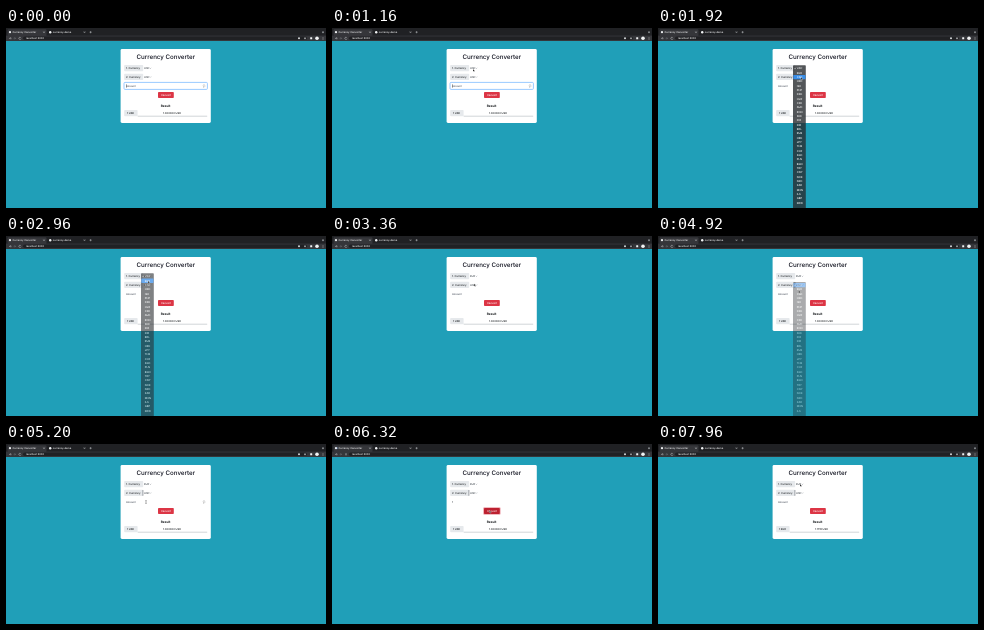
Recreate the animation shown at these times as an HTML page. Size 320x180 px, loop 8000 ms.

```html
<!DOCTYPE html>
<html lang="en">
<head>
<meta charset="utf-8">
<title>Currency Converter</title>
<style>
html, body { margin: 0; width: 100%; height: 100%; overflow: hidden; background: #209fb8; }
svg { display: block; width: 100vw; height: 100vh; }
text { font-family: Inter, Roboto, "Liberation Sans", sans-serif; font-size: 2.6px; font-weight: 500; fill: #1c2024; text-rendering: geometricPrecision; }
.ui { font-size: 2.5px; fill: #f4f5f6; }
.item { font-size: 2.6px; fill: #fff; }
.mid { text-anchor: middle; }
</style>
</head>
<body>
<svg id="stage" viewBox="0 0 320 180"></svg>
<script>
const LOOP = 8000;
const PITCH = 4.33;
const CODES = ('USD EUR CAD HKD ISK PHP DKK HUF CZK AUD RON SEK IDR INR BRL RUB ' +
  'HRK JPY THB CHF SGD PLN BGN TRY CNY NOK NZD ZAR MXN ILS GBP KRW').split(' ');
const stage = document.getElementById('stage');

function add(tag, attrs, parent = stage) {
  const el = document.createElementNS('http://www.w3.org/2000/svg', tag);
  for (const k in attrs) el.setAttribute(k, attrs[k]);
  parent.appendChild(el);
  return el;
}
const rect = (x, y, width, height, fill, rx = 0, parent) =>
  add('rect', { x, y, width, height, fill, rx }, parent);
const dot = (cx, cy, r, fill) => add('circle', { cx, cy, r, fill });
const line = (d, stroke, w = 0.5, parent) =>
  add('path', { d, stroke, 'stroke-width': w, fill: 'none' }, parent);
function label(x, y, str, attrs = {}, parent) {
  const el = add('text', { x, y, ...attrs }, parent);
  el.textContent = str;
  return el;
}
const cross = (x, y, s) => `M${x - s} ${y - s}l${2 * s} ${2 * s}m0 ${-2 * s}l${-2 * s} ${2 * s}`;

// browser frame
rect(0, 0, 320, 180, '#209fb8');
rect(0, 0, 320, 8, '#202124');
rect(1.5, 1.2, 39, 7, '#35363a', 1.2);
rect(0, 7.6, 320, 5.4, '#35363a');
rect(17, 8.4, 284, 3.7, '#202124', 1.8);
dot(4, 4.2, 1.1, '#f1f3f4');
const spin = line('M4 2.9a1.3 1.3 0 0 1 1.3 1.3', '#8ab4f8', 0.5);
label(6.5, 5.1, 'Currency Converter', { class: 'ui' });
line(cross(38, 4.2, 0.7), '#e8eaed', 0.4);
dot(44.2, 4.2, 1.2, '#f1f3f4');
label(46.8, 5.1, 'currency-demo', { class: 'ui' });
line(cross(78.5, 4.2, 0.7), '#e8eaed', 0.4);
line('M83.5 4.2h2.2m-1.1 -1.1v2.2', '#e8eaed', 0.4);
dot(317, 4.2, 1, '#85898d');
line('M4.6 9.3l-1 1 1 1m-1 -1h2', '#e8eaed', 0.4);
line('M8.6 9.3l1 1 -1 1m1 -1h-2', '#85898d', 0.4);
const reload = line('M14.8 9.6a1.1 1.1 0 1 0 .2 1.1', '#e8eaed', 0.4);
const halt = line(cross(14, 10.3, 0.8), '#e8eaed', 0.4);
label(20, 11.2, 'localhost:3000', { class: 'ui' });
dot(293, 10.3, 1, '#d5d8db');
line('M298 10.3h2m-1 -1v2', '#e8eaed', 0.5);
rect(304.2, 9.3, 2, 2, '#f1f3f4', 0.3);
dot(311, 10.3, 1.8, '#f1f3f4');
for (let i = 0; i < 3; i++) dot(317, 9.3 + i, 0.35, '#e8eaed');

// card
rect(114.6, 21, 90.2, 74, '#fff', 1.4);
label(159.8, 31.3, 'Currency Converter', { class: 'mid', style: 'font-size:6.2px;fill:#0d0f1c' });

function picker(y, n) {
  rect(118.2, y, 19, 6.2, '#e6e9ec', 0.8);
  label(120, y + 4, n + '. Currency');
  line(`M143.8 ${y + 2.8}l.7 .7 .7 -.7`, '#5b6168', 0.35);
  return label(138, y + 4, 'USD', { style: 'fill:#495057' });
}
const first = picker(37, 1);
picker(45.8, 2);
const edge = line('M136.9 46v5.8', '#50565c', 0.5);

const ring = rect(118, 54.4, 83.4, 7, '#fff', 1);
ring.setAttribute('stroke', '#80bdff');
ring.setAttribute('stroke-width', 0.8);
const amount = label(120, 58.8, 'Amount');
const caret = rect(120.2, 56.2, 0.4, 3.6, '#333');
const arrows = line('M197.2 57.5l.8 -.8 .8 .8m0 1l-.8 .8 -.8 -.8', '#555', 0.5);

const halo = rect(151.2, 63.3, 17.4, 7.4, '#eda5ad', 1.2);
const button = rect(152, 64, 15.8, 6, '#dc3545', 0.8);
label(159.9, 67.9, 'Convert', { class: 'mid', style: 'fill:#fff' });

label(159.6, 79.3, 'Result', { class: 'mid', style: 'font-size:3.2px;font-weight:700;fill:#15181b' });
rect(118.2, 82, 13.4, 6.2, '#e6e9ec', 0.8);
line('M131.6 88.2h69.6', '#b4babf', 0.6);
const base = label(121, 86, '1 USD');
const result = label(157, 86, '1.000000 USD');

// popup menus
function menu(top, mid, count) {
  const g = add('g', {});
  rect(135, top, 12.8, 180 - top + 2, 'rgba(40,44,48,.8)', 0.8, g);
  const bar = rect(135.3, 0, 12.2, PITCH, '#3a8ee8', 0.4, g);
  for (let i = 0; i < count; i++) label(138.8, mid + i * PITCH + 0.9, CODES[i], { class: 'item' }, g);
  line(`M136.4 ${mid}l.6 .7 1 -1.5`, '#fff', 0.4, g);
  return { g, bar, mid, count };
}
const menuA = menu(37.2, 40.4, 32);
const menuB = menu(46, 49.2, 30);

const arrow = add('path', { d: 'M0 0v2.6l.6 -.6 .5 1 .4 -.2 -.4 -.9h.8z', fill: '#111', stroke: '#fff', 'stroke-width': 0.25 });
const beam = line('M-.5 -1.5h1m-.5 0v3m-.5 0h1', '#222', 0.4);

// time, x, y
const PATH = [
  [320, 9, 131], [1120, 141, 41], [1400, 141, 41], [1880, 143, 49.2], [2000, 143, 49.2],
  [2300, 143, 62], [2640, 142, 44.8], [3160, 142, 44.8], [3480, 142, 49], [3680, 142, 49],
  [3940, 142, 54], [4200, 142, 49], [4760, 142, 49], [5040, 140, 58], [5400, 140, 58],
  [5760, 157.4, 66.4], [6840, 157.4, 66.4], [6960, 157.8, 66.7], [7120, 157.8, 66.7], [7920, 142, 40]
];
const clamp = v => Math.max(0, Math.min(1, v));
const ramp = (t, a, b) => clamp((t - a) / (b - a));
const within = (t, a, b) => t >= a && t < b;
const show = (el, on) => el.setAttribute('opacity', +on);

function pointer(t) {
  let i = 0;
  while (i < PATH.length - 2 && t >= PATH[i + 1][0]) i++;
  const a = PATH[i], b = PATH[i + 1];
  const u = ramp(t, a[0], b[0]), e = u * u * (3 - 2 * u);
  return [a[1] + (b[1] - a[1]) * e, a[2] + (b[2] - a[2]) * e];
}

function drawMenu(m, t, open, click, gone, y) {
  show(m.g, t < open ? 0 : 1 - ramp(t, click + 80, gone));
  const row = Math.max(0, Math.min(m.count - 1, Math.round((y - m.mid) / PITCH)));
  if (t < click) m.bar.setAttribute('y', m.mid + (row - 0.5) * PITCH);
  else m.bar.setAttribute('y', m.mid + (m.pick - 0.5) * PITCH);
  show(m.bar, !within(t, click, click + 40));
}
menuA.pick = 1;
menuB.pick = 0;

function draw(t) {
  const [x, y] = pointer(t);
  const onInput = within(t, 5000, 5440);
  show(arrow, t >= 320 && !onInput);
  show(beam, onInput);
  arrow.setAttribute('transform', `translate(${x} ${y})`);
  beam.setAttribute('transform', `translate(${x} ${y})`);

  drawMenu(menuA, t, 1240, 2800, 3200, y);
  drawMenu(menuB, t, 3560, 4720, 5040, y);

  const focus = 1 - ramp(t, 1200, 1350) + ramp(t, 5280, 5430) - ramp(t, 6240, 6320);
  show(ring, focus);
  show(arrows, t < 1200 || within(t, 5040, 6240));
  const typed = within(t, 5360, 6680);
  amount.textContent = typed ? '1' : 'Amount';
  amount.style.fill = typed ? '#343a40' : '#525a66';
  caret.setAttribute('x', typed ? 121.6 : 120);
  show(caret, t < 160 || within(t, 680, 1200) || within(t, 5300, 6000));

  first.textContent = t < 2800 ? 'USD' : 'EUR';
  show(edge, t >= 3500);
  const pressed = within(t, 6240, 6680);
  const hover = within(t, 5640, 7360);
  button.setAttribute('fill', pressed ? '#bd2130' : hover ? '#c82333' : '#dc3545');
  show(halo, pressed);

  const done = t >= 6680;
  base.textContent = done ? '1 EUR' : '1 USD';
  result.textContent = done ? '1.1719 USD' : '1.000000 USD';

  const loading = within(t, 6240, 6680);
  show(spin, loading);
  spin.setAttribute('transform', `rotate(${(t - 6240) * 0.5} 4 4.2)`);
  show(halt, loading);
  show(reload, !loading);
}

const start = performance.now();
function tick() {
  draw((performance.now() - start) % LOOP);
  requestAnimationFrame(tick);
}
tick();
</script>
</body>
</html>
```
